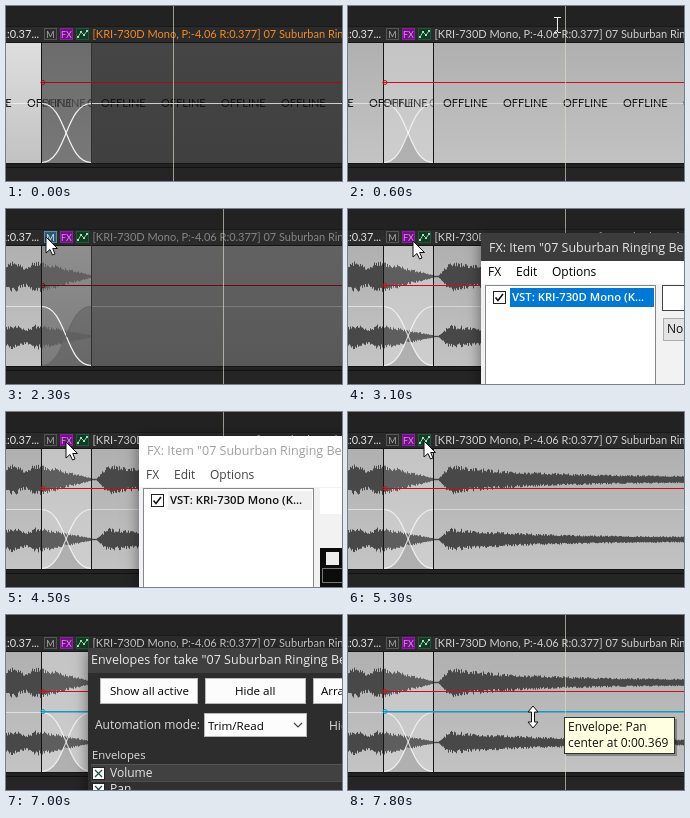
Animation, 336 px wide and 175 px high, one loop 8 s. Source, as an HTML page with a canvas:

```html
<!DOCTYPE html>
<html lang="en">
<head>
<meta charset="utf-8">
<title>Take buttons</title>
<style>
html, body { margin: 0; width: 100%; height: 100%; overflow: hidden; background: #222; }
canvas { display: block; width: 336px; height: 175px; }
</style>
</head>
<body>
<canvas id="stage" width="336" height="175"></canvas>
<script>
const ctx = document.getElementById('stage').getContext('2d');
const W = 336, H = 175, LOOP = 8000;
const PLUGIN = 'KRI-730D Mono';
const TAKE = '07 Suburban Ringing Belfry';
const LATO = '11px Lato, sans-serif';
const UI = '500 12px "Open Sans", sans-serif';
const TITLE = '12.5px "Open Sans", sans-serif';

// Mouse path: time, x, y
const PATH = [
  [100, 219, 6], [300, 209, 18], [700, 209, 18], [1400, 41, 30], [1700, 41, 30],
  [1800, 40, 28], [2500, 40, 28], [2800, 65, 32], [3900, 65, 32], [4200, 50, 31],
  [4500, 60, 30], [4800, 60, 30], [5000, 65, 31], [5300, 76, 29], [5400, 76, 29],
  [5800, 128, 173], [5900, 128, 173], [6100, 93, 176], [6400, 93, 176],
  [7000, 342, 60], [7600, 342, 50], [7700, 240, 80], [7800, 185, 102]
];
// Spans in which the edit cursor is dark
const BLINK = [[1000, 1400], [1800, 2200], [2700, 3100], [3500, 3900], [4100, 4400],
  [4700, 5000], [5200, 5600], [6100, 6500], [7000, 7400]];

const within = (t, a, b) => t >= a && t < b;
const mix = (a, b, k) => a + (b - a) * k;

function rect(x, y, w, h, fill) {
  ctx.fillStyle = fill;
  ctx.fillRect(x, y, w, h);
}

function frame(x, y, w, h, color) {
  ctx.strokeStyle = color;
  ctx.lineWidth = 1;
  ctx.strokeRect(x + .5, y + .5, w - 1, h - 1);
}

function text(s, x, y, color, font = UI, align = 'left') {
  ctx.font = font;
  ctx.fillStyle = color;
  ctx.textAlign = align;
  ctx.textBaseline = 'alphabetic';
  ctx.fillText(s, x, y);
}

function line(points, color, width = 1) {
  ctx.beginPath();
  points.forEach(([x, y], i) => i ? ctx.lineTo(x, y) : ctx.moveTo(x, y));
  ctx.strokeStyle = color;
  ctx.lineWidth = width;
  ctx.stroke();
}

function clip(x, y, w, h, draw) {
  ctx.save();
  ctx.beginPath();
  ctx.rect(x, y, w, h);
  ctx.clip();
  draw();
  ctx.restore();
}

function shade(x, w, top, bottom) {
  const g = ctx.createLinearGradient(0, 37, 0, 157);
  g.addColorStop(0, top);
  g.addColorStop(1, bottom);
  rect(x, 37, w, 120, g);
}

const noise = n => {
  const v = Math.sin(n * 127.1 + 31.7) * 43758.5453;
  return v - Math.floor(v);
};

function wave(from, to, cy, amp, color, seed) {
  ctx.fillStyle = color;
  for (let x = from; x < to; x++) {
    const a = amp(x);
    const up = a * (.6 + .4 * noise(x + seed));
    const down = a * (.6 + .4 * noise(x * 1.7 + seed + 9));
    ctx.fillRect(x, cy - up, 1, up + down + 1);
  }
}

const leftAmp = x => (x < 35 ? 13 + 3 * Math.sin(x / 4) : 15 * Math.max(0, 1 - (x - 35) / 52) + .5);
const rightAmp = x => Math.min(Math.max(.3, (x - 90) * 1.3), 2.5 + 13 * Math.exp(-(x - 96) / 85));

function fadePath(y0, y1) {
  const p = new Path2D();
  p.moveTo(35.5, y0);
  p.bezierCurveTo(61, y0, 59, y1, 85.5, y1);
  return p;
}

function fadeArea(y0, y1) {
  const p = fadePath(y0, y1);
  p.lineTo(85.5, 157);
  p.lineTo(35.5, 157);
  return p;
}

function fadeCurve(y0, y1, color) {
  ctx.strokeStyle = color;
  ctx.lineWidth = 1.2;
  ctx.stroke(fadePath(y0, y1));
}

function offlineRow(start, from, to, color) {
  clip(from, 37, to - from, 120, () => {
    for (let x = start; x < to; x += 60) text('OFFLINE', x, 101, color, LATO);
  });
}

function envelopeLine(y, color, height = 1) {
  rect(36, y, W - 36, height, color);
  ctx.beginPath();
  ctx.arc(37, y + .5, 2, 0, 7);
  ctx.strokeStyle = color;
  ctx.lineWidth = 1;
  ctx.stroke();
}

function button(x, fill, edge) {
  rect(x, 22, 13, 12, fill);
  frame(x, 22, 13, 12, edge);
}

function header(color, muted) {
  rect(0, 21, W, 15, '#2b2b2b');
  text('R:0.37...', -6, 32, '#e2e2e2', LATO);
  button(38, muted ? '#2f5870' : '#2d2d2d', muted ? '#5d8da8' : '#555');
  text('M', 44.5, 31.5, muted ? '#d8eaf2' : '#aaa', '9px Lato, sans-serif', 'center');
  button(54, '#730f88', '#8a1fa0');
  text('FX', 60.5, 31.5, '#d890e6', '9px Lato, sans-serif', 'center');
  button(70, '#143a25', '#1f5a38');
  line([[72, 31], [75, 26], [78, 29], [81, 25]], '#7fd19d');
  [[72, 31], [75, 26], [78, 29], [81, 25]].forEach(([x, y]) => rect(x - 1, y - 1, 2, 2, '#a5e0b8'));
  text(`[${PLUGIN}, P:-4.06 R:0.377] ${TAKE}`, 86.5, 32, color, LATO);
}

function arrange(t) {
  const picked = t < 600, offline = t < 800;
  const muted = within(t, 1500, 2400);
  const dark = picked || muted;

  rect(0, 0, W, H, '#222');
  rect(0, 20, W, 1, '#1a1a1a');
  header(picked ? '#f08a24' : muted ? '#858585' : '#cfcfcf', muted);

  if (picked) shade(0, 35, '#dedede', '#c2c2c2');
  else shade(0, 35, '#b0b0b0', '#c4c4c4');
  if (picked) shade(35, 51, '#6c6c6c', '#787878');
  else if (muted) shade(35, 51, '#8e8e8e', '#7c7c7c');
  else shade(35, 51, '#c4c4c4', '#cecece');
  if (picked) shade(86, W - 86, '#454545', '#404040');
  else if (muted) shade(86, W - 86, '#626262', '#585858');
  else shade(86, W - 86, '#b0b0b0', '#c2c2c2');

  if (!dark) {
    ctx.save();
    ctx.clip(fadeArea(97, 157));
    ctx.fillStyle = 'rgba(0,0,0,.14)';
    ctx.fill(fadeArea(157, 97));
    ctx.restore();
  } else if (muted) {
    ctx.fillStyle = 'rgba(0,0,0,.16)';
    ctx.fill(fadeArea(157, 97));
  }

  if (offline) {
    offlineRow(-39, 0, 35, '#111');
    offlineRow(21, 35, 86, picked ? '#333' : '#777');
    offlineRow(35, 35, 86, picked ? '#444' : '#333');
    offlineRow(95, 86, W, '#111');
  } else {
    [[67, 3], [127, 40]].forEach(([cy, seed], i) => {
      const k = i ? .78 : 1;
      wave(0, 35, cy, x => leftAmp(x) * k, '#484848', seed);
      wave(35, 86, cy, x => leftAmp(x) * k, muted ? '#606060' : '#5e5e5e', seed);
      if (!muted) wave(86, W, cy, x => rightAmp(x) * k, '#484848', seed + 60);
    });
  }

  rect(0, 97, 35, 1, 'rgba(255,255,255,.55)');
  if (t < 6300) rect(86, 97, W - 86, 1, picked ? '#d0d0d0' : muted ? '#7c7c7c' : 'rgba(255,255,255,.4)');
  const soft = 'rgba(255,255,255,.7)';
  fadeCurve(97.5, 156.5, dark ? '#f5f5f5' : soft);
  fadeCurve(156.5, 97.5, picked ? '#f5f5f5' : muted ? '#696969' : soft);

  rect(0, 36, W, 1, '#151515');
  rect(0, 157, W, 1, '#151515');
  rect(35, 36, 1, 122, '#151515');
  rect(85, 36, 1, 122, dark ? '#303030' : '#151515');
  rect(0, 161, W, 1, '#111');
  rect(0, 162, W, 13, '#252525');

  envelopeLine(76, picked ? '#a80c16' : muted ? '#650d14' : '#c81018');
  if (t >= 6300) envelopeLine(96, '#0f9cc4', 1.5);

  if (!BLINK.some(([a, b]) => within(t, a, b)))
    rect(t < 400 ? 167 : 217, 0, 1, H, 'rgba(225,220,200,.65)');
}

function shadowed(x, y, fill) {
  ctx.save();
  ctx.shadowColor = 'rgba(0,0,0,.5)';
  ctx.shadowBlur = 14;
  ctx.shadowOffsetY = 3;
  rect(x, y, W - x + 30, H - y + 30, fill);
  ctx.restore();
}

function checkbox(x, y, size, mark) {
  rect(x, y, size, size, '#fff');
  frame(x, y, size, size, '#222');
  if (mark === 'tick') line([[x + 2.5, y + 6.5], [x + 5, y + 9.5], [x + 10, y + 3]], '#111', 1.6);
  if (mark === 'cross') {
    line([[x + 3, y + 3], [x + size - 3, y + size - 3]], '#225044', 1.3);
    line([[x + size - 3, y + 3], [x + 3, y + size - 3]], '#225044', 1.3);
  }
}

function fxWindow(t) {
  const active = t < 4000, loaded = t >= 3400;
  shadowed(133, 24, '#f2f2f2');
  rect(133, 24, W, 28, active ? '#3c3c3c' : '#fff');
  text(`FX: Item "${TAKE}"`, 141, 43, active ? '#e6e6e6' : '#a0a0a0', TITLE);
  rect(133, 52, W, 23, '#fff');
  const menu = active ? '#000' : '#444';
  text('FX', 140, 67, menu);
  text('Edit', 168, 67, menu);
  text('Options', 204, 67, menu);
  rect(137, 76, 171, H, '#fff');
  frame(137, 76, 171, H, '#828790');
  checkbox(145, 82, 13, 'tick');
  rect(162, 79, 144, 19, active ? '#0078d7' : '#f0f0f0');
  text(`VST: ${PLUGIN} (K...`, 164, 92, active ? '#fff' : '#111', '600 11.3px "Open Sans", sans-serif');
  rect(314, 76, 30, 26, '#fff');
  if (loaded) {
    rect(314, 136, 22, 39, '#0c0c0c');
    rect(320, 140, 13, 13, '#eee');
    frame(316, 156, 30, 15, '#777');
  } else {
    frame(314, 76, 30, 26, '#444');
    rect(315, 109, 30, 23, '#e3e3e3');
    frame(315, 109, 30, 23, '#adadad');
    text('No', 319, 124, '#111');
  }
}

function whiteButton(x, y, w, h, label, tx) {
  rect(x, y, w, h, '#fcfcfc');
  frame(x, y, w, h, '#b8b8b8');
  text(label, tx, y + 17, '#000', '500 11.6px "Open Sans", sans-serif');
}

function envelopeWindow(t) {
  shadowed(82, 33, '#2d2d2d');
  rect(82, 33, W, 25, '#404040');
  text(`Envelopes for take "${TAKE}"`, 85, 49, '#e8e8e8', TITLE);
  whiteButton(94, 63, 98, 26, 'Show all active', 104);
  whiteButton(199, 63, 101, 26, 'Hide all', 229);
  whiteButton(307, 63, 60, 26, 'Arrange', 315);
  text('Automation mode:', 89, 114, '#ddd');
  whiteButton(198, 98, 103, 24, 'Trim/Read', 202);
  line([[288, 108], [292, 112], [296, 108]], '#444', 1.2);
  text('Hide', 323, 115, '#ddd');
  text('Envelopes', 86, 144, '#ddd', '500 11.3px "Open Sans", sans-serif');
  rect(85, 150, W, 16, '#414141');
  rect(85, 166, W, 9, '#303030');
  rect(85, 149, W, 1, '#555');
  rect(85, 166, W, 1, '#4c4c4c');
  checkbox(86, 152, 13, 'cross');
  text('Volume', 104, 162, '#e6e6e6');
  checkbox(86, 168, 13, t >= 6300 ? 'cross' : '');
  text('Pan', 104, 178, '#e6e6e6');
}

function poly(points, fill) {
  ctx.beginPath();
  points.forEach(([x, y], i) => i ? ctx.lineTo(x, y) : ctx.moveTo(x, y));
  ctx.closePath();
  ctx.fillStyle = fill;
  ctx.fill();
  ctx.strokeStyle = '#111';
  ctx.lineWidth = 1;
  ctx.stroke();
}

function mouseAt(t) {
  const i = PATH.findIndex(p => p[0] > t);
  if (i < 0) return PATH[PATH.length - 1].slice(1);
  const [t0, x0, y0] = PATH[i - 1], [t1, x1, y1] = PATH[i];
  const k = (t - t0) / (t1 - t0), e = k * k * (3 - 2 * k);
  return [mix(x0, x1, e), mix(y0, y1, e)];
}

function mouse(t) {
  if (t < 100) return;
  const [x, y] = mouseAt(t);
  ctx.save();
  ctx.translate(Math.round(x), Math.round(y));
  if (t >= 7800) {
    poly([[0, -11], [5, -5], [1.5, -5], [1.5, 5], [5, 5], [0, 11], [-5, 5], [-1.5, 5], [-1.5, -5], [-5, -5]], '#fff');
  } else if (y < 21) {
    rect(0, -7, 1, 15, '#eee');
    rect(-3, -7, 3, 1, '#eee');
    rect(1, -7, 3, 1, '#eee');
    rect(-3, 8, 3, 1, '#eee');
    rect(1, 8, 3, 1, '#eee');
  } else {
    poly([[0, 0], [0, 16], [4, 12.5], [6.5, 18], [9, 17], [6.7, 11.5], [11.5, 11.5]], '#fff');
  }
  ctx.restore();
}

function tooltip() {
  rect(218, 104, 111, 37, 'rgba(0,0,0,.3)');
  rect(216, 102, 111, 37, '#ffffe1');
  frame(216, 102, 111, 37, '#333');
  text('Envelope: Pan', 220, 116, '#111');
  text('center at 0:00.369', 220, 132, '#111');
}

function draw(now) {
  const t = Math.floor((now % LOOP) / 100) * 100;
  arrange(t);
  if (within(t, 3100, 4600)) fxWindow(t);
  if (within(t, 5400, 7600)) envelopeWindow(t);
  if (t >= 7800) tooltip();
  mouse(t);
}

let start;
function tick(now) {
  start ??= now;
  draw(now - start);
  requestAnimationFrame(tick);
}
draw(0);
requestAnimationFrame(tick);
</script>
</body>
</html>
```
